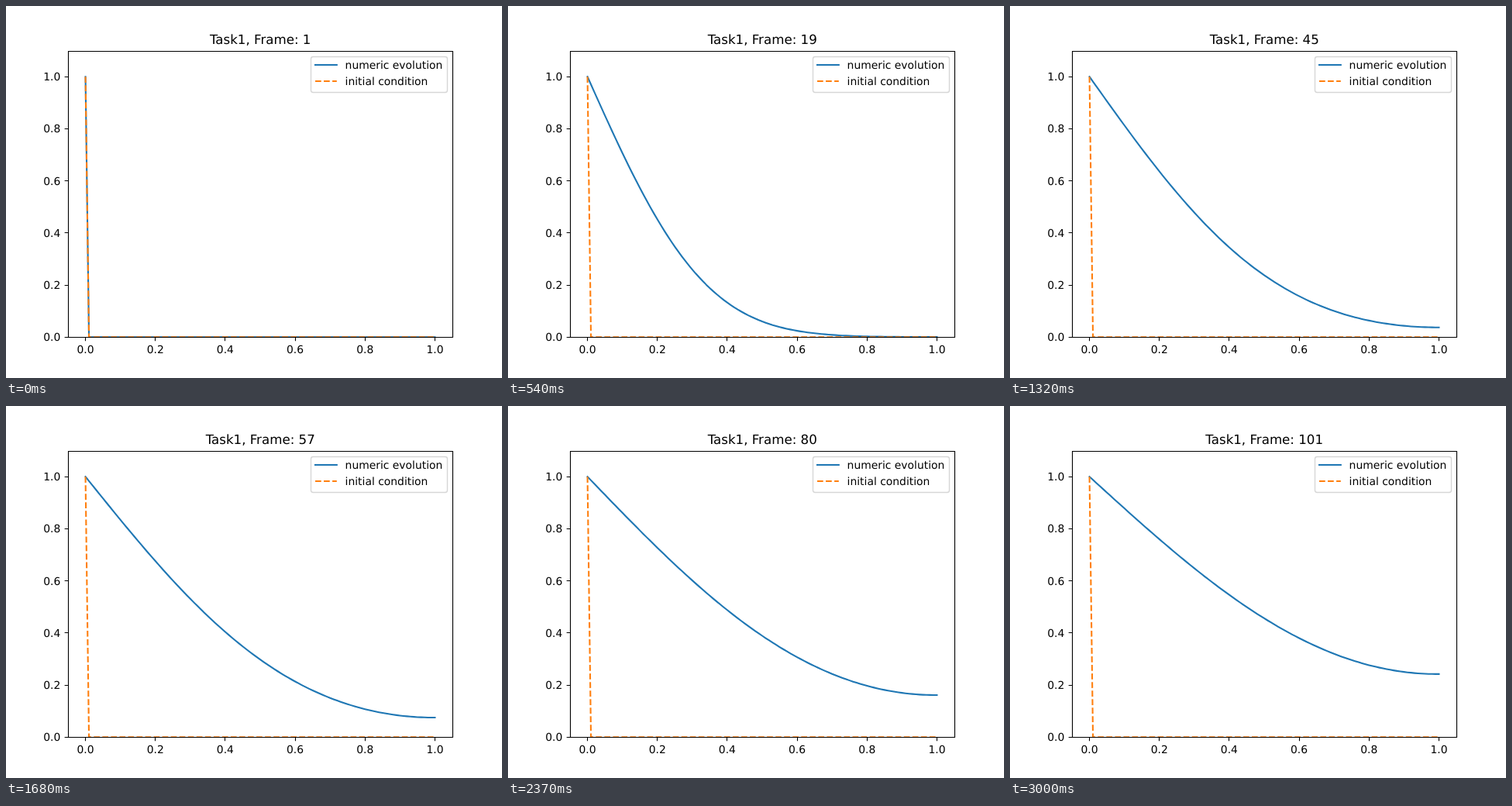
Recreate the animation shown at these times as an HTML page. Size 640 by 480 pixels, loop 3030 ms.

```html
<!DOCTYPE html>
<html>
<head>
<meta charset="utf-8">
<style>
  html, body { margin: 0; width: 100%; height: 100%; overflow: hidden; background: #fff; }
  svg { display: block; }
  text { font: 13.89px "DejaVu Sans", sans-serif; text-rendering: geometricPrecision; }
  .title { font-size: 16.67px; }
  .mid { text-anchor: middle; }
  .end { text-anchor: end; }
  path { fill: none; }
  .axis { stroke: #000; stroke-width: 1.11; }
  .solid, .dash { stroke-width: 2.083; stroke-linejoin: round; }
  .solid { stroke: #1f77b4; stroke-linecap: square; }
  .dash { stroke: #ff7f0e; stroke-dasharray: 7.708 3.333; }
</style>
</head>
<body>
<svg width="640" height="480" viewBox="0 0 640 480">
  <clipPath id="plot"><rect x="80" y="58" width="497" height="370"/></clipPath>
  <g clip-path="url(#plot)">
    <path id="curve" class="solid"/>
    <path id="start" class="dash"/>
  </g>
  <path class="axis" d="M80.5 58.5H576.5V427.5H80.5Z"/>
  <g id="ticks"></g>
  <text id="title" class="title mid" x="328.2" y="49"></text>
  <rect x="393.5" y="65.5" width="176" height="46" rx="2.8" fill="#fff" fill-opacity=".8" stroke="#ccc" stroke-opacity=".8" stroke-width="1.39"/>
  <path class="solid" d="M399 76H426.8"/>
  <path class="dash" d="M399 97H426.8"/>
  <text x="437.6" y="81">numeric evolution</text>
  <text x="437.6" y="102">initial condition</text>
</svg>
<script>
const FRAMES = 101, STEP = 30, POINTS = 100;
const LENGTH = 0.995, RATE = 0.00208;
const $ = id => document.getElementById(id);
const px = x => 102.545 + 450.909 * x;
const py = u => 427.2 - 336 * u;

const plot = f => 'M' + Array.from({ length: POINTS + 1 }, (_, i) => {
  const x = i / POINTS;
  return px(x).toFixed(2) + ' ' + py(f(x)).toFixed(2);
}).join('L');

const initial = x => x ? 0 : 1;

// Heat equation: fixed value 1 on the left, insulated right end
function heat(x, time) {
  let u = 1;
  for (let k = 1; k < 100; k += 2) {
    const w = k * Math.PI / 2 / LENGTH;
    u -= 4 / (k * Math.PI) * Math.sin(w * x) * Math.exp(-w * w * time);
  }
  return u;
}

let ticks = '';
for (let i = 0; i <= 5; i++) {
  const v = i / 5, label = v.toFixed(1);
  const x = Math.floor(px(v)) + 0.5, y = Math.floor(py(v) + 0.01) + 0.5;
  ticks += `<path class="axis" d="M${x} 427.5v4.86M80.5 ${y}h-4.86"/>
    <text class="mid" x="${px(v)}" y="448">${label}</text>
    <text class="end" x="70.3" y="${Math.round(py(v) + 5)}">${label}</text>`;
}
$('ticks').innerHTML = ticks;
$('start').setAttribute('d', plot(initial));

let shown = -1;
function draw(now) {
  const n = Math.floor(now / STEP) % FRAMES;
  if (n !== shown) {
    shown = n;
    const time = RATE * (n - 1);
    $('curve').setAttribute('d', plot(time > 0 ? x => heat(x, time) : initial));
    $('title').textContent = `Task1, Frame: ${n + 1}`;
  }
  requestAnimationFrame(t => draw(Math.max(0, t - begin)));
}
const begin = performance.now();
draw(0);
</script>
</body>
</html>
```
